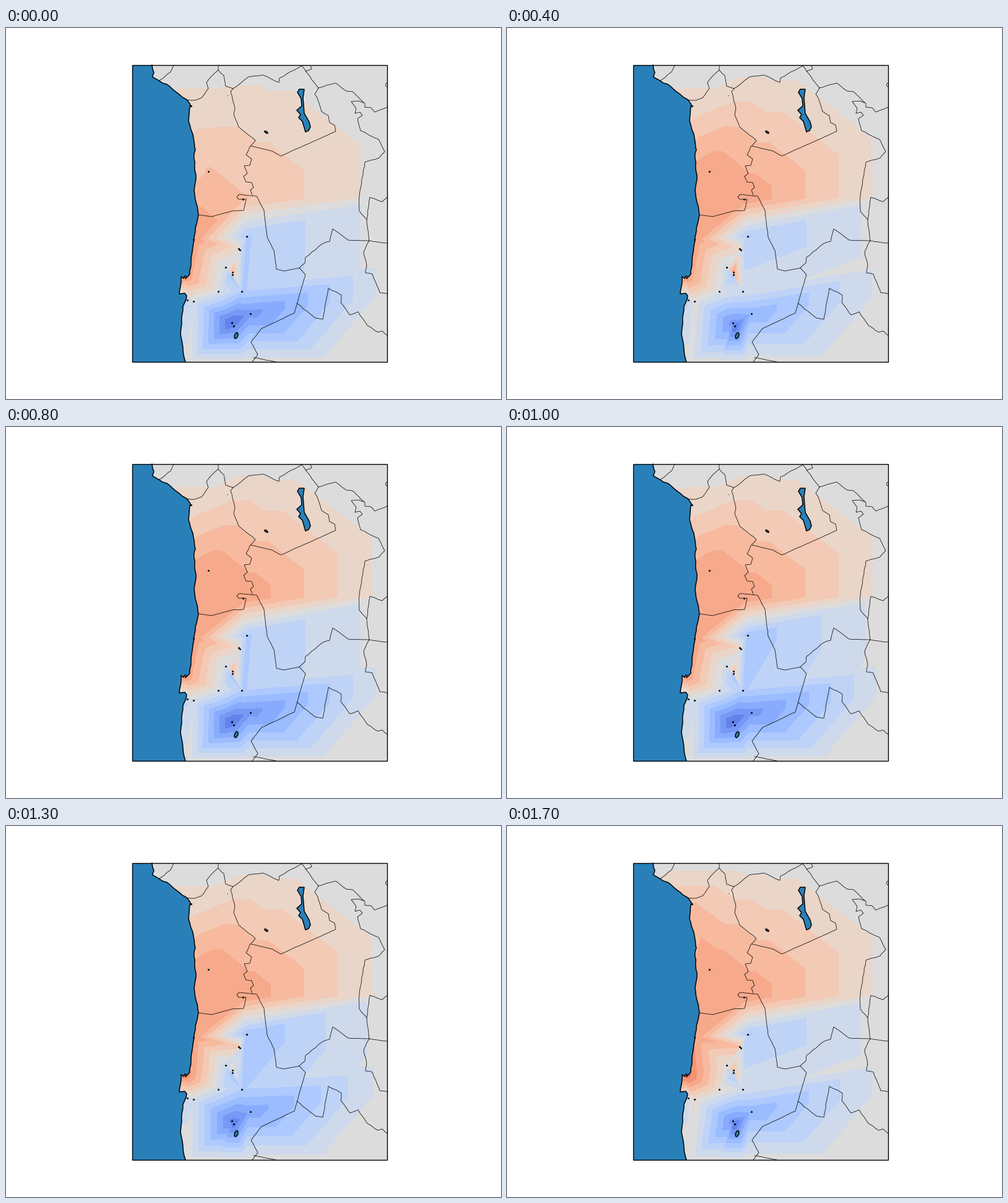
A matplotlib script that plays this animation: 800 by 600 pixels, repeating every 2000 ms.

```python
import numpy as np
import matplotlib.pyplot as plt
from matplotlib.animation import FuncAnimation
from matplotlib.patches import Ellipse, Rectangle
from matplotlib.tri import Triangulation

LEFT, TOP, RIGHT, BOTTOM = 204, 60, 616, 540
WATER = "#2980b9"
PX = 0.72  # points per pixel at 100 dpi
UNIT = 0.866  # one step of the measured value

rng = np.random.default_rng(4)
fig = plt.figure(figsize=(8, 6), dpi=100, facecolor="white")
ax = fig.add_axes([0, 0, 1, 1])
ax.set_xlim(0, 800)
ax.set_ylim(600, 0)
ax.axis("off")
ax.set_autoscale_on(False)


def roughen(points, size, step=7):
    """Break every straight stretch into short, slightly displaced pieces."""
    points = np.array(points, float)
    line = [points[0]]
    for a, b in zip(points, points[1:]):
        run = b - a
        length = np.hypot(*run)
        normal = np.array([-run[1], run[0]]) / length
        for t in np.arange(step, length - step / 2, step) / length:
            line.append(a + t * run + normal * rng.uniform(-size, size))
        line.append(b)
    return np.array(line)


def border(*points, size=0.6):
    ax.plot(*roughen(points, size).T, color="black", lw=0.75 * PX, zorder=4)


def lake(shape, **style):
    shape.set(ec="black", lw=1.5 * PX, zorder=5, **style)
    ax.add_patch(shape)


# Sea and coast
coast = roughen(
    [(236, 60), (239, 72), (236.5, 79), (247, 85), (264, 94), (274, 103),
     (294, 118), (298, 124), (296, 140), (295, 150), (302, 172), (306, 197),
     (304, 203), (307, 245), (304, 262), (311, 302), (304, 338), (301.5, 358),
     (297, 398), (293, 403), (289, 401), (287, 405), (283, 402), (283, 411),
     (280, 430), (289, 429), (292, 433), (291, 439), (286, 450), (282, 495),
     (286, 520), (290, 540)], size=0.8)
ax.fill(*np.vstack([(LEFT, TOP), coast, (LEFT, BOTTOM)]).T,
        color=WATER, lw=0, zorder=3)
ax.plot(*coast.T, color="black", lw=1.5 * PX, zorder=5)

# Lakes
long_lake = [(474, 99), (482, 99), (480, 113), (482, 138), (490, 152),
             (492, 160), (489, 166), (484, 168), (479, 151), (473, 145),
             (476, 140), (470, 133), (478, 126), (477, 114), (471, 104)]
lake(plt.Polygon(long_lake), fc=WATER)
lake(Ellipse((420.5, 168.5), 6, 2.5, angle=35), fc=WATER)
lake(Ellipse((372, 497.5), 5, 10, angle=20), fc="#2a8a9c")

# Northern borders
border((271, 60), (266, 71), (248, 85))
border((292, 116), (305, 117), (316, 113), (327, 98), (324, 88), (332, 78),
       (343, 68))
border((343, 60), (343, 68), (352, 77), (355, 94), (367, 98), (392, 79),
       (415, 76), (441, 88), (442, 81), (478, 61), (497, 87), (505, 97))
border((484, 70), (494, 66), (492, 61))
border((367, 98), (363, 103), (370, 130), (368, 140), (376, 160), (403, 182),
       (394, 192), (388, 205), (397, 212), (394, 222), (385, 223), (390, 235),
       (384, 240), (388, 249), (397, 250), (400, 258), (395, 262), (398, 270))
border((396, 191), (430, 199), (444, 207), (518, 174), (533, 167), (531, 157),
       (523, 153), (521, 142), (510, 135), (503, 113), (499, 107), (505, 97),
       size=0.3)

# Eastern borders
border((505, 97), (533, 89), (550, 102), (560, 103), (580, 122), (580, 128),
       (590, 129), (596, 136), (616, 128))
border((578, 121), (570, 118), (558, 119), (566, 130), (564, 138), (572, 136),
       (576, 141), (568, 147), (573, 166), (602, 180), (612, 200), (603, 210),
       (580, 217), (571, 272), (571, 296), (583, 310))
border((616, 274), (608, 281), (588, 274), (583, 310), (587, 344), (616, 348))
border((587, 344), (553, 343), (528, 325), (523, 345), (511, 349), (484, 371),
       (483, 380), (474, 388))
border((587, 344), (578, 362), (583, 385), (581, 396), (592, 398), (604, 428),
       (616, 430))

# Central and southern borders
border((311, 302), (333, 305), (365, 296), (384, 295), (388, 277), (376, 277),
       (373, 273), (377, 269), (405, 272), (417, 295), (422, 338), (433, 360),
       (437, 390), (450, 393), (474, 388), (484, 399), (466, 461), (413, 486),
       (396, 508), (407, 528), (398, 540), size=0.3)
border((400, 533), (436, 540), size=0.3)
border((470, 445), (500, 469), (512, 471), (521, 421), (542, 432), (541, 444),
       (556, 464), (569, 459), (584, 481), (601, 492), (608, 490), (616, 497))

ax.add_patch(Ellipse((616, 92), 5, 6, fill=False, lw=0.75 * PX, zorder=4,
                     clip_path=None))
ax.add_patch(Rectangle((RIGHT + 1, TOP), 9, BOTTOM - TOP, color="white",
                       lw=0, zorder=5))
ax.plot(357.5, 109, "o", ms=0.7, mew=0, color="black", zorder=4)
ax.add_patch(Rectangle((LEFT, TOP), RIGHT - LEFT, BOTTOM - TOP, fill=False,
                       ec="black", lw=1.4 * PX, zorder=6))

# Measuring points: x, y and usual value in units
stations = {
    "north": (299, 125.5, 1), "plain": (327, 232, 5), "mine": (382.5, 277, 5),
    "ridge": (388.5, 336.5, -3), "pit": (376, 356.5, 1),
    "oasis": (377.5, 359, -1), "cross": (355, 387, -1),
    "hill": (365.5, 394.5, 3), "foot": (365.5, 399, -3.5),
    "pass": (342.5, 425.5, -0.3), "east": (381, 426, -3),
    "port": (292.5, 440, -2), "town": (302.5, 441.5, -0.8),
    "salt": (394.5, 461.5, -7), "peak": (365, 476.5, -9),
    "south": (367.5, 482, -8), "quay": (303, 342, 5), "bay": (290, 404, 5)}

# Each phase swells, holds and fades between four ticks
phases = {
    "start": (-1, 0, 0, 2), "surge": (0, 2, 2, 4), "heat": (0, 2, 4, 8),
    "calm": (2, 4, 4, 8), "noon": (9, 12, 12, 14), "shade": (9, 13, 14, 17),
    "later": (9, 12, 20, 21), "dusk": (12, 14, 20, 21),
    "night": (14, 17, 20, 21)}
shifts = {
    "start": {"plain": -2, "mine": -2},
    "surge": {"north": 2, "pit": 1},
    "heat": {"hill": 2},
    "calm": {"east": 2, "salt": 2, "peak": 2, "south": -1, "town": 0.8},
    "noon": {"ridge": -2},
    "shade": {"hill": -3, "pass": -0.7, "cross": -0.5},
    "later": {"pit": 1, "port": 1},
    "dusk": {"bay": 2, "salt": 2, "peak": 2, "south": -1},
    "night": {"north": 2, "pit": 1, "east": 2, "town": 1.6, "pass": 1,
              "cross": 1}}

spots = np.array([(x, y) for x, y, _ in stations.values()])
ax.plot(*spots.T, "o", ms=3 * PX, mew=0, color="black", zorder=4.5)

# The field falls to zero on an evenly divided frame
xs = np.linspace(LEFT, RIGHT, 10)
ys = np.linspace(TOP, BOTTOM, 10)
rim = ([(x, y) for y in (TOP, BOTTOM) for x in xs]
       + [(x, y) for x in (LEFT, RIGHT) for y in ys[1:-1]])
mesh = Triangulation(*np.vstack([spots, rim]).T)
levels = np.arange(-9.5, 10)
field = None


def station_values(tick):
    values = {name: base for name, (_, _, base) in stations.items()}
    for phase, ticks in phases.items():
        strength = np.interp(tick, ticks, (0, 1, 1, 0))
        for name, shift in shifts[phase].items():
            values[name] += strength * shift
    return UNIT * np.array(list(values.values()))


def update(tick):
    global field
    if field is not None:
        field.remove()
    values = np.append(station_values(tick), np.zeros(len(rim)))
    field = ax.tricontourf(mesh, values, levels=levels, cmap="coolwarm",
                           zorder=1)
    return field,


anim = FuncAnimation(fig, update, frames=20, interval=100, repeat=True,
                     init_func=lambda: update(0), blit=False)
plt.show()
```
